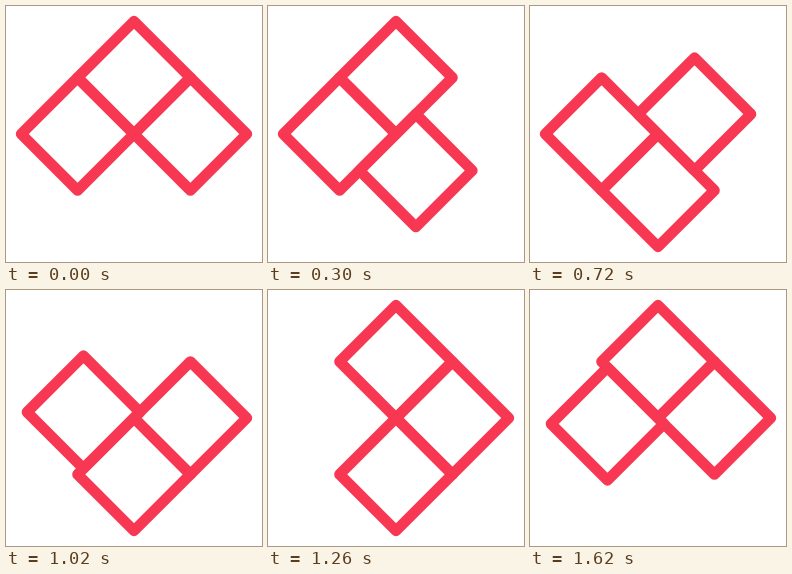
Animation, 256 px wide and 256 px high, one loop 1.68 s. Source, as an HTML page:

```html
<!DOCTYPE html>
<html lang="en">
<head>
<meta charset="utf-8">
<title>Sliding squares</title>
<style>
  html, body { margin: 0; width: 100%; height: 100%; overflow: hidden; background: #fff; }
  svg { display: block; width: 100%; height: 100%; }
  path { fill: none; stroke: #f83853; stroke-width: 10.8; stroke-linejoin: round; }
</style>
</head>
<body>
<svg viewBox="0 0 256 256"></svg>
<script>
const R = 56.4;            // half diagonal of a square
const TURN = 420;          // one slide plus its rest
const STEP = 60;           // the motion advances in steps of this length
const svg = document.querySelector('svg');

const squares = [0, 1, 2].map(() => {
  const path = document.createElementNS('http://www.w3.org/2000/svg', 'path');
  path.setAttribute('d', `M0 ${-R}L${R} 0L0 ${R}L${-R} 0Z`);
  return svg.appendChild(path);
});

// Slots run clockwise: 0 right, 1 bottom, 2 left, 3 top.
const slot = i => [128 + R * Math.cos(i * Math.PI / 2), 128 + R * Math.sin(i * Math.PI / 2)];

const place = (square, [x, y]) => square.setAttribute('transform', `translate(${x} ${y})`);

const smooth = p => p * p * (3 - 2 * p);

function draw(ms) {
  const t = Math.floor(ms / STEP) * STEP % (4 * TURN);
  const from = 4 - Math.floor(t / TURN);
  const p = smooth(Math.min(1, Math.max(0, (t % TURN - 120) / 300)));
  const a = slot(from), b = slot(from + 1);
  place(squares[0], a.map((v, i) => v + (b[i] - v) * p));
  place(squares[1], slot(from + 2));
  place(squares[2], slot(from + 3));
}

let start;
function tick(now) {
  start ??= now;
  draw(now - start + 0.5);
  requestAnimationFrame(tick);
}
draw(0);
requestAnimationFrame(tick);
</script>
</body>
</html>
```
